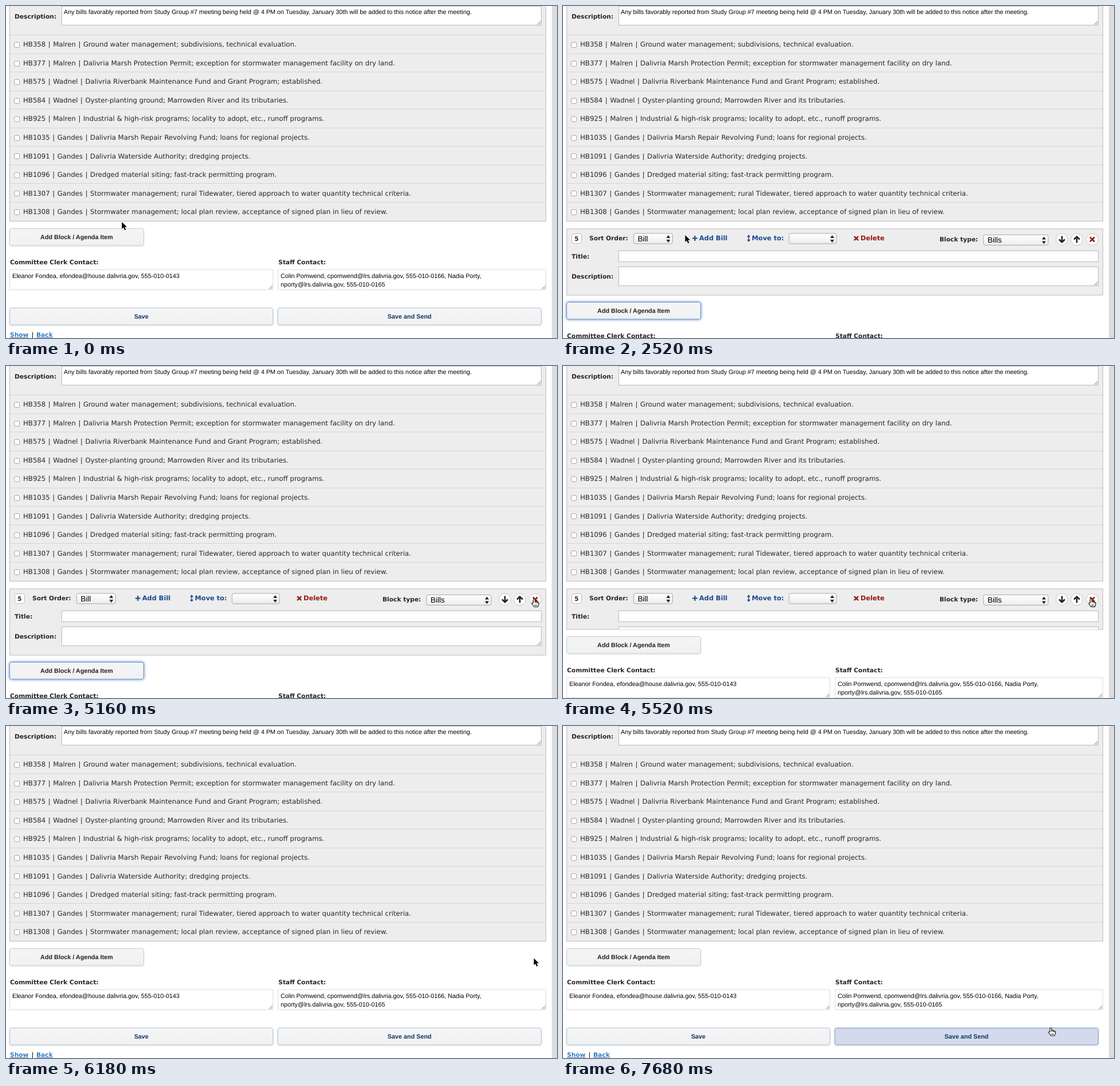
These frames come from a looping animation (963x581 px, 7740 ms). An HTML page:

```html
<!DOCTYPE html>
<html lang="en">
<head>
<meta charset="utf-8">
<title>Agenda editor</title>
<style>
  html, body { margin: 0; width: 100%; height: 100%; overflow: hidden; background: #fff; }
  svg { display: block; }
  text { text-rendering: geometricPrecision; white-space: pre; fill: #2b2528; }
  .row { font: 11.75px "DejaVu Sans", sans-serif; }
  .label { font: bold 10.67px "DejaVu Sans", sans-serif; }
  .action { font: bold 11.4px "DejaVu Sans", sans-serif; fill: #1c4b91; }
  .red { fill: #971a12; }
  .field { font: 10.8px "Liberation Sans", Arial, sans-serif; fill: #000; }
  .option { font: 13.5px "Liberation Sans", Arial, sans-serif; fill: #000; }
  .button { font: bold 10.8px "Liberation Sans", Arial, sans-serif; text-anchor: middle; fill: #222; }
  .navy { fill: #123564; }
  .link { fill: #3c7cc0; text-decoration: underline; }
  .hover { fill: #d2daec; stroke: #7f9ac4; }
</style>
</head>
<body>
<svg id="stage" width="963" height="581" viewBox="0 0 963 581"></svg>
<script>
const LOOP = 7740, STEP = 60, OPEN_AT = 1700, CLOSE_AT = 5360, SLIDE = 400, FULL = 129;

const bills = [
  ["HB358", "Malren", "Ground water management; subdivisions, technical evaluation."],
  ["HB377", "Malren", "Dalivria Marsh Protection Permit; exception for stormwater management facility on dry land."],
  ["HB575", "Wadnel", "Dalivria Riverbank Maintenance Fund and Grant Program; established."],
  ["HB584", "Wadnel", "Oyster-planting ground; Marrowden River and its tributaries."],
  ["HB925", "Malren", "Industrial &amp; high-risk programs; locality to adopt, etc., runoff programs."],
  ["HB1035", "Gandes", "Dalivria Marsh Repair Revolving Fund; loans for regional projects."],
  ["HB1091", "Gandes", "Dalivria Waterside Authority; dredging projects."],
  ["HB1096", "Gandes", "Dredged material siting; fast-track permitting program."],
  ["HB1307", "Gandes", "Stormwater management; rural Tidewater, tiered approach to water quantity technical criteria."],
  ["HB1308", "Gandes", "Stormwater management; local plan review, acceptance of signed plan in lieu of review."]
];

const text = (x, y, cls, s) => `<text x="${x}" y="${y}" class="${cls}">${s}</text>`;
const rect = (x, y, w, h, fill, stroke = "none", r = 0, extra = "") =>
  `<rect x="${x}" y="${y}" width="${w}" height="${h}" rx="${r}" fill="${fill}" stroke="${stroke}" ${extra}/>`;
const path = (d, stroke, width = 1, extra = "") =>
  `<path d="${d}" fill="none" stroke="${stroke}" stroke-width="${width}" ${extra}/>`;

const area = (x, y, w, h, stroke = "#b9b9b9") =>
  rect(x, y, w, h, "#fff", stroke) +
  path(`M${x + w - 7} ${y + h - 1}l6-6m-3 6l3-3`, "#777");

const select = (x, y, w, label = "") =>
  rect(x, y, w, 18, "url(#soft)", "#a9a9a9", 3) +
  `<path d="M${x + w - 11} ${y + 8}l3.5-5 3.5 5zm0 3l3.5 5 3.5-5z" fill="#222"/>` +
  text(x + 7, y + 13.5, "option", label);

const button = (id, x, y, w, label, stroke, cls = "") =>
  rect(x, y, w, 29.5, "url(#face)", stroke, 3, `id="${id}" filter="url(#shade)"`) +
  text(x + w / 2, y + 18.5, "button " + cls, label);

const disc = (x, d, stroke) =>
  `<circle cx="${x}" cy="408.5" r="10.3" fill="#fff" stroke="#c6c6c6"/>` +
  path(`M${x} 408.5${d}`, stroke, 2.6);

function billRow([id, patron, title], i) {
  const y = 67 + i * 32.56, bar = '<tspan dx=".7">|</tspan><tspan dx=".7"> </tspan>';
  return path(`M7 ${Math.round(y - 17) + .5}H943`, "#d5d5d5") +
    rect(14.5, Math.round(y - 4) + .5, 9, 9, "#fff", "#a5a5a5", 2) +
    text(30, y + 4.2, "row", `${id} ${bar}${patron} ${bar}${title}`);
}

const block = `
  ${rect(15.5, 398.5, 17, 17, "#fff", "#bdbdbd", 3)}${text(20, 411, "label", "5")}
  ${text(46, 409.7, "label", "Sort Order:")}${select(123.5, 398, 68, "Bill")}
  ${path("M230.5 402v9M226 406.5h9", "#1c4b91", 2.2)}${text(238, 410, "action", "Add Bill")}
  ${path("M324.5 402v9M322.3 404l2.2-2.5 2.2 2.5M322.3 409l2.2 2.5 2.2-2.5", "#1c4b91", 1.5)}
  ${text(330, 410, "action", "Move to:")}${select(395, 398, 83)}
  ${path("M509 403.2l7 7m0-7l-7 7", "#971a12", 2.4)}${text(520, 410, "action red", "Delete")}
  ${text(658, 412, "label", "Block type:")}${select(735, 400.5, 113, "Bills")}
  ${disc(872, "m0-6v11m-5-5l5 5 5-5", "#222")}
  ${disc(898, "m0 6v-11m-5 5l5-5 5 5", "#222")}
  ${disc(925, "m-4-4l8 8m0-8l-8 8", "#a01a12")}
  ${text(15, 442, "label", "Title:")}${rect(97.5, 428.5, 838, 19, "#fff", "#b9b9b9")}
  ${text(15, 477, "label", "Description:")}${area(97.5, 456.5, 838, 33)}`;

stage.innerHTML = `
  <defs>
    <linearGradient id="face" x2="0" y2="1"><stop stop-color="#f5f5f6"/><stop offset="1" stop-color="#f0f1f2"/></linearGradient>
    <linearGradient id="soft" x2="0" y2="1"><stop stop-color="#fff"/><stop offset="1" stop-color="#ececec"/></linearGradient>
    <filter id="shade" x="-5%" y="-30%" width="110%" height="160%"><feDropShadow dx="0" dy="1" stdDeviation="1.8" flood-opacity=".14"/></filter>
    <filter id="glow" x="-5%" y="-40%" width="110%" height="180%"><feDropShadow dx="0" dy="0" stdDeviation="2.4" flood-color="#2f6fc4" flood-opacity=".9"/></filter>
    <clipPath id="clip"><rect id="mask" x="7" y="390" width="937" height="0"/></clipPath>
  </defs>
  ${rect(954, 0, 9, 581, "#dcdcdc")}
  ${rect(6.5, -5, 937, 381.5, "#ededed", "#bcbcbc")}
  ${text(15, 21.5, "label", "Description:")}${area(97.5, .5, 838, 33)}
  ${text(101, 14.2, "field", "Any bills favorably reported from Study Group #7 meeting being held @ 4 PM on Tuesday, January 30th will be added to this notice after the meeting.")}
  ${bills.map(billRow).join("")}
  ${rect(6.5, 390, 937, 0, "#ededed", "#bcbcbc", 0, 'id="panel"')}
  <g clip-path="url(#clip)">${block}</g>
  <g id="lower">
    ${button("add", 6.5, 389.5, 234, "Add Block / Agenda Item", "#cdcdcd")}
    ${text(7, 451.7, "label", "Committee Clerk Contact:")}${area(6.5, 461.5, 460, 35, "#dcdcdc")}
    ${text(11, 475.8, "field", "Eleanor Fondea, efondea@house.dalivria.gov, 555-010-0143")}
    ${text(476, 451.7, "label", "Staff Contact:")}${area(475.5, 461.5, 468, 35, "#dcdcdc")}
    ${text(480, 475.8, "field", "Colin Pomwend, cpomwend@lrs.dalivria.gov, 555-010-0166, Nadia Porty,")}
    ${text(480, 491.3, "field", "nporty@lrs.dalivria.gov, 555-010-0165")}
    ${button("save", 6.5, 528.5, 460, "Save", "#afc2d8", "navy")}
    ${button("send", 475, 528.5, 460.5, "Save and Send", "#afc2d8", "navy")}
    ${text(7, 579, "label link", "Show")}${text(44.5, 579, "label", "|")}${text(53, 579, "label link", "Back")}
  </g>
  <path id="arrow" d="M0 0V12L2.8 9.4 4.9 14.3 7 13.4 4.9 8.7H8.7Z" stroke="#fff" stroke-width="1" fill="#000" paint-order="stroke"/>
  <path id="hand" d="M-1.5 1.5Q0-1 1.4 1.5V5Q3 4 4 5.6 5.5 4.8 6.3 6.4 8 6 8 8V11L6.5 14.5H.2L-3.8 9Q-4.2 6.8-1.5 8ZM1.4 5V7.5M4 5.6V8M6.3 6.4V8.5M1.7 10.5V13M4 10.5V13" fill="#fff" stroke="#111" stroke-width="1.1"/>`;

// Pointer stops: time, x, y
const stops = [
  [0, 202.5, 378], [120, 202.5, 378], [780, 184, 401], [2100, 184, 401], [2400, 213.5, 401],
  [2580, 213.5, 401], [2880, 250, 404], [3120, 262, 405], [3480, 540, 404], [3900, 790, 406],
  [4200, 883, 404], [4380, 883, 404], [4620, 898, 405], [4980, 923, 407], [6360, 922.5, 406.5],
  [7320, 852.5, 527.5], [LOOP, 852.5, 527.5]
];
const clamp = v => Math.min(1, Math.max(0, v));
const swing = p => .5 - Math.cos(Math.PI * clamp(p)) / 2;
const inside = (x, y, l, t, r, b) => x >= l && x <= r && y >= t && y <= b;

function pointer(t) {
  const i = stops.findIndex(s => s[0] > t), [t0, x0, y0] = stops[i - 1], [t1, x1, y1] = stops[i];
  const k = swing((t - t0) / (t1 - t0));
  return [x0 + (x1 - x0) * k, y0 + (y1 - y0) * k];
}

function draw(t) {
  const drop = Math.round(FULL * (swing((t - OPEN_AT) / SLIDE) - swing((t - CLOSE_AT) / SLIDE)));
  const height = Math.max(0, drop - 13);
  lower.setAttribute("transform", `translate(0 ${drop})`);
  mask.setAttribute("height", height);
  panel.setAttribute("height", height);
  panel.style.display = height ? "" : "none";

  const [x, y] = pointer(t);
  const onAdd = inside(x, y, 6, 389 + drop, 241, 419 + drop);
  const onSend = inside(x, y, 475, 527 + drop, 936, 558 + drop);
  const onBlock = height > 20 && [[226, 288], [508, 562], [862, 935]]
    .some(([l, r]) => inside(x, y, l, 398, r, 419));
  const focused = t >= OPEN_AT - 60 && t < CLOSE_AT;
  add.classList.toggle("hover", onAdd);
  send.classList.toggle("hover", onSend);
  add.setAttribute("filter", focused ? "url(#glow)" : "url(#shade)");
  add.setAttribute("stroke", focused ? "#6f96cc" : "#cdcdcd");

  const grab = onAdd || onSend || onBlock;
  for (const [el, on] of [[arrow, !grab], [hand, grab]]) {
    el.style.display = on ? "" : "none";
    el.setAttribute("transform", `translate(${x} ${y})`);
  }
}

const start = performance.now();
function tick() {
  const t = (performance.now() - start) % LOOP;
  draw(Math.floor(t / STEP) * STEP);
  requestAnimationFrame(tick);
}
tick();
</script>
</body>
</html>
```
